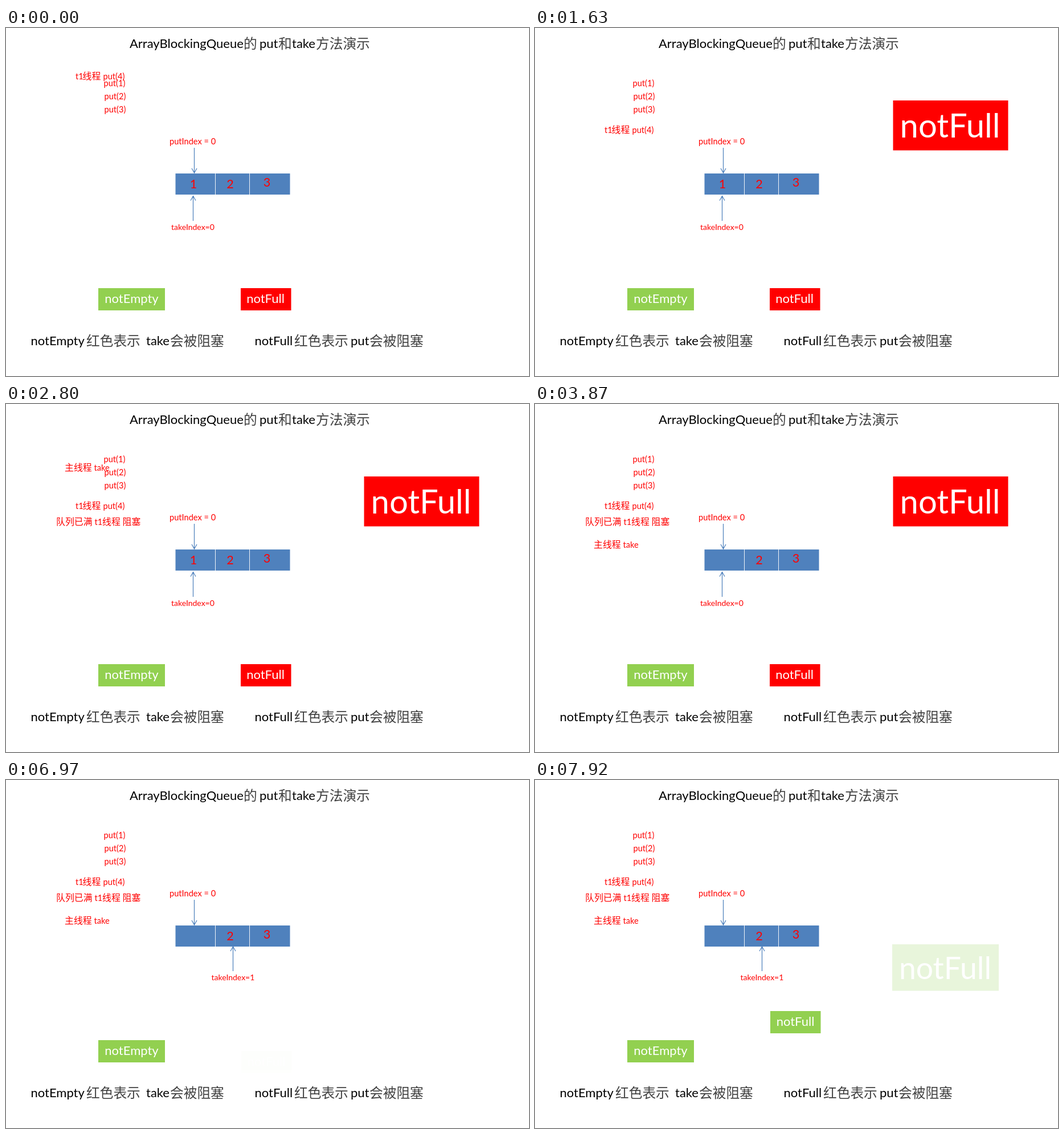
Animation, 918 px wide and 610 px high, one loop 8000 ms. Source, as an HTML page:

```html
<!DOCTYPE html>
<html lang="zh">
<head>
<meta charset="utf-8">
<title>ArrayBlockingQueue</title>
<style>
  html, body { margin: 0; width: 100%; height: 100%; overflow: hidden; background: #fff; }
  svg { display: block; font-family: Lato, "Noto Sans CJK SC", "Noto Sans CJK", sans-serif; }
  .large { font-size: 22px; }
  .large .han { font-size: 23.7px; font-weight: 300; fill: #404040; }
  .small { font-size: 14.6px; fill: #f00; }
  .small .han { font-size: 15.9px; }
  .index { font-size: 14px; fill: #f00; }
  .digit { font-size: 21.5px; fill: #f00; text-anchor: middle; }
  .label { font-size: 22px; fill: #fff; text-anchor: middle; }
  .arrow { fill: none; stroke: #4a7ebb; stroke-width: 1.2; }
  .red { fill: #f00; }
  .green { fill: #92d050; }
</style>
</head>
<body>
<svg width="918" height="610" viewBox="0 0 918 610">
  <g class="large">
    <text y="35">
      <tspan x="217">ArrayBlockingQueue</tspan><tspan class="han" x="417" y="36">的</tspan>
      <tspan x="445" y="35">put</tspan><tspan class="han" x="478" y="36">和</tspan>
      <tspan x="502" y="35">take</tspan><tspan class="han" x="544" y="36">方法演示</tspan>
    </text>
    <text y="556">
      <tspan x="43.5">notEmpty</tspan><tspan class="han" x="141" y="557">红色表示</tspan>
      <tspan x="246" y="556">take</tspan><tspan class="han" x="288" y="557">会被阻塞</tspan>
      <tspan x="436.5" y="556">notFull</tspan><tspan class="han" x="506" y="557">红色表示</tspan>
      <tspan x="605" y="556">put</tspan><tspan class="han" x="638" y="557">会被阻塞</tspan>
    </text>
  </g>

  <path fill="#4f81bd" d="M297.5 255h201v37h-201z"/>
  <path stroke="#f0f4f9" d="M367.5 255v37M427.5 255v37"/>
  <text class="digit" id="one" x="329" y="281">1</text>
  <text class="digit" x="393.5" y="281">2</text>
  <text class="digit" x="458" y="278">3</text>

  <path class="arrow" d="M330.5 210v44m-4.5-8l4.5 8l4.5-8"/>
  <text class="small" x="287" y="204">putIndex = 0</text>
  <g id="take0">
    <path class="arrow" d="M328.5 338v-43.5m-4.5 8l4.5-8l4.5 8"/>
    <text class="index" x="290" y="354">takeIndex=0</text>
  </g>
  <g id="take1">
    <path class="arrow" d="M398.5 335v-43m-4.5 8l4.5-8l4.5 8"/>
    <text class="index" x="360.5" y="351">takeIndex=1</text>
  </g>

  <g class="small">
    <text x="171.5" y="102">put(1)</text>
    <text x="172.5" y="125">put(2)</text>
    <text x="172.5" y="148">put(3)</text>
    <text id="put4" y="184">
      <tspan x="122">t1</tspan><tspan class="han" x="134.5">线程</tspan>
      <tspan x="170.5">put(4)</tspan>
    </text>
    <text id="blocked" y="212">
      <tspan class="han" x="88">队列已满</tspan><tspan x="155.5">t1</tspan>
      <tspan class="han" x="169">线程</tspan><tspan class="han" x="204.5">阻塞</tspan>
    </text>
    <text id="mainTake" y="252">
      <tspan class="han" x="103">主线程</tspan><tspan x="154.5">take</tspan>
    </text>
  </g>

  <path class="green" d="M162 456h117v39h-117z"/>
  <text class="label" x="220.5" y="482">notEmpty</text>
  <g id="full">
    <path class="red" d="M412 456h88.5v39h-88.5z"/>
    <text class="label" x="455.5" y="482">notFull</text>
  </g>
  <g id="free">
    <path class="green" d="M413 405h88.5v39h-88.5z"/>
    <text class="label" x="457" y="431">notFull</text>
  </g>
  <g id="bigFull">
    <path class="red" d="M628.5 127h202v87.5h-202z"/>
    <text class="label" x="728.5" y="192" style="font-size:58px">notFull</text>
  </g>
  <g id="bigFree" opacity=".2">
    <path class="green" d="M627 288h187v81.5h-187z"/>
    <text class="label" x="720" y="348.5" style="font-size:53.5px">notFull</text>
  </g>
</svg>
<script>
const LOOP = 8000;
const el = id => document.getElementById(id);
const show = (id, on) => el(id).setAttribute('visibility', on ? 'visible' : 'hidden');
const move = (id, x, y) => el(id).setAttribute('transform', `translate(${x} ${y})`);

// Index of the current step of a stepped move; -1 before it begins.
const step = (t, start, end, count) =>
  Math.max(-1, Math.min(count - 1, Math.floor((t - start) / (end - start) * (count - 1) + 1e-6)));

function draw(t) {
  move('put4', 0, -94 * (1 - (step(t, 70, 850, 11) + 1) / 11));

  show('bigFull', t >= 1630 && t < 6190);

  show('blocked', t >= 1780);
  move('blocked', 0, -195 * (1 - step(t, 1780, 2410, 9) / 8));

  show('mainTake', t >= 2560);
  move('mainTake', 0, Math.min(0, -225 + 30 * step(t, 2560, 3340, 11)));

  const slide = step(t, 3184, 3870, 10);
  show('one', t < 3870);
  move('one', slide < 0 ? 0 : -12 - 37 * slide, 0);

  // The new take marker shows briefly in place, then flies in from below.
  const rise = step(t, 4880, 5490, 9);
  show('take0', t < 4710);
  show('take1', t >= 4710);
  move('take1', 0, rise < 0 ? 0 : 300 * (1 - rise / 8));

  const ascend = step(t, 6970, 7770, 11);
  show('full', t < 6970);
  show('free', t >= 6970);
  move('free', 0, 70 * (1 - ascend / 10));
  el('free').setAttribute('opacity', Math.max(.01, ascend / 10));

  show('bigFree', t >= 7920);
}

const begin = performance.now();
function tick() {
  draw((performance.now() - begin) % LOOP);
  requestAnimationFrame(tick);
}
tick();
</script>
</body>
</html>
```
